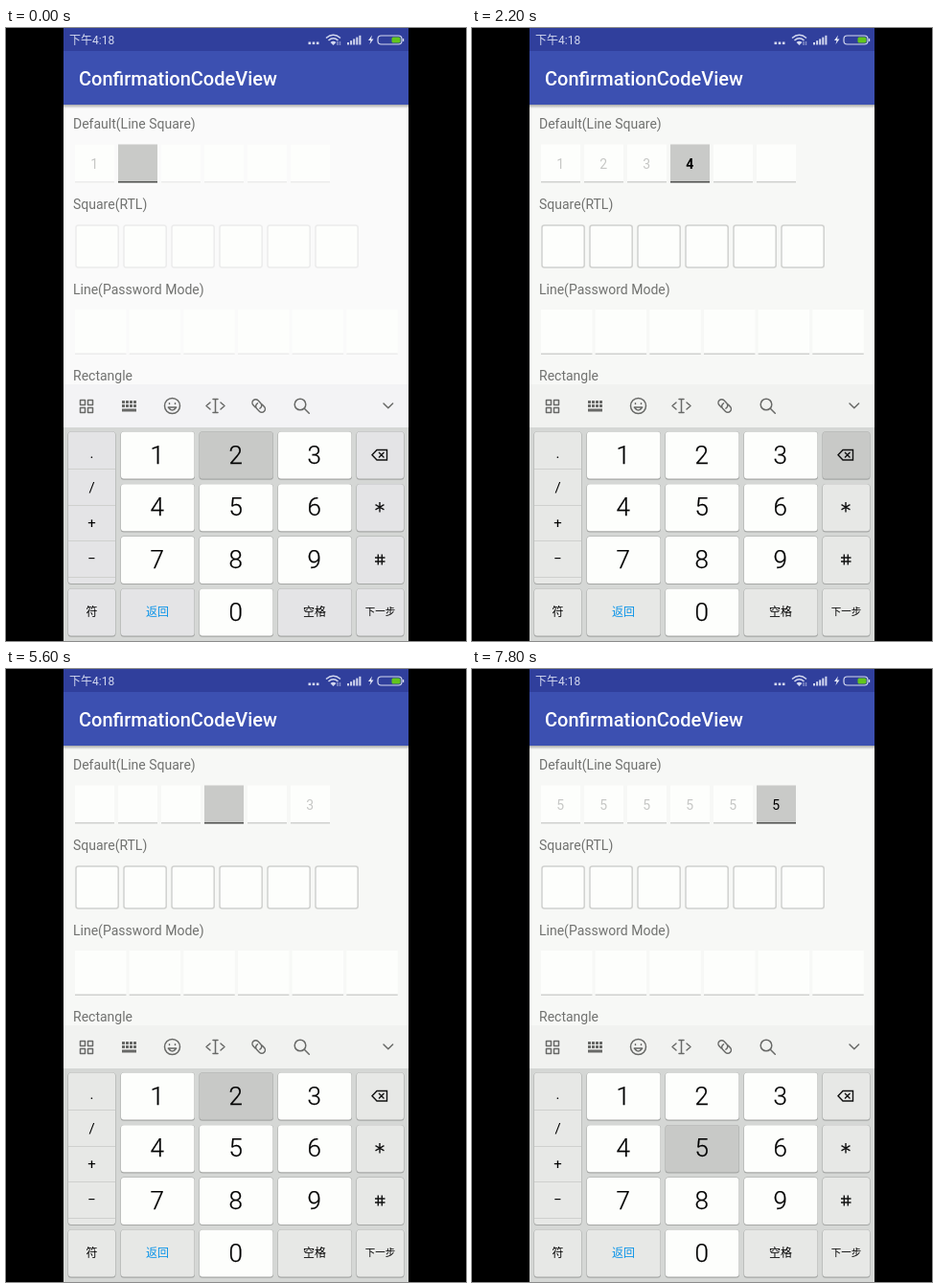
These frames come from a looping animation (480x640 px, 8 s). An HTML page:

```html
<!DOCTYPE html>
<html lang="en">
<head>
<meta charset="utf-8">
<title>Code input demo</title>
<style>
html, body { margin: 0; width: 100%; height: 100%; overflow: hidden; background: #000; }
svg { display: block; width: 480px; height: 640px; font-family: Roboto, "Noto Sans CJK SC", "Noto Sans CJK", sans-serif;
  --page: #f7f8f6; --line: #d0d1cf; --bar: #f1f2f0; --soft: #e7e8e6; }
svg.fresh { --page: #fafafa; --line: #ececec; --bar: #f3f3f5; --soft: #e4e4e6; }
.label { font-size: 14px; fill: #717270; }
.cell rect { fill: #fdfefc; }
.cell path { stroke: var(--line); stroke-width: 1.5; }
.cell text { font-size: 14px; fill: #c6c7c5; text-anchor: middle; }
.cell.focus rect { fill: #c9cac8; }
.cell.focus path { stroke: #555654; }
.cell.focus text { fill: #000; }
.erasing .cell.focus text { font-weight: 700; }
.square { fill: #fdfefc; stroke: var(--line); stroke-width: 1.5; }
.key .shade { fill: #a6a8a6; }
.key .face { fill: #fdfefc; }
.key.soft .face { fill: var(--soft); }
.key.down .face { fill: #c8c9c7; }
.key text { text-anchor: middle; fill: #000; }
.num { font-size: 26px; font-weight: 300; stroke: #000; stroke-width: .25px; }
.small { font-size: 12px; }
.icon { fill: none; stroke: #686967; stroke-width: 1.5; stroke-linecap: round; stroke-linejoin: round; }
.ink { fill: none; stroke: #111; stroke-width: 1.4; }
.status { fill: none; stroke: #d3d8ef; stroke-width: 1.5; }
</style>
</head>
<body>
<svg id="stage" viewBox="0 0 480 640"></svg>
<script>
const stage = document.getElementById('stage');
const times = (n, make) => Array.from({ length: n }, (_, i) => make(i)).join('');
const rect = (x, y, w, h, fill, extra = '') =>
  `<rect x="${x}" y="${y}" width="${w}" height="${h}" ${fill ? `fill="${fill}"` : ''} ${extra}/>`;
const text = (x, y, content, cls, extra = '') =>
  `<text x="${x}" y="${y}" class="${cls}" ${extra}>${content}</text>`;
const path = (d, cls, extra = '') => `<path d="${d}" class="${cls}" ${extra}/>`;

const lineCell = (x, y, w, h, id = '') =>
  `<g class="cell" ${id && `id="${id}"`}>${rect(x, y, w, h)}
   <path d="M${x} ${y + h - .7}h${w}"/><text x="${x + w / 2 - .2}" y="147"></text></g>`;

const ROW = 54.7;
const key = (id, x, row, w, content, soft, rows = 1) => {
  const y = 421.5 + row * ROW, h = 49 + (rows - 1) * ROW;
  return `<g class="key ${soft ? 'soft' : ''}" id="key-${id}">
    ${rect(x - .5, y - .3, w + 1, h + 1.5, '', 'rx="3.5" class="shade"')}
    ${rect(x, y, w, h, '', 'rx="3" class="face"')}${content}</g>`;
};
const digit = (n, col, row) =>
  key(n, 120 + col * 82, row, 76.5, text(157.8 + col * 82, 454.7 + row * ROW, n, 'num'));

function statusBar() {
  return rect(60, 0, 360, 24, '#303f9c')
    + text(66, 17, '下午4:18', 'time', 'font-size="12" fill="#d3d8ef"')
    + times(3, i => rect(315.5 + i * 4.2, 14.5, 2.6, 2.6, '#d3d8ef'))
    + path('M334 10.5Q341.5 4 349 10.5M336.5 13Q341.5 8.5 346.5 13', 'status')
    + path('M338.5 15Q341.5 12.5 344.5 15L341.5 18Z', '', 'fill="#d3d8ef"')
    + path('M346 14v4M348.5 14v4', 'status', 'opacity=".5"')
    + times(5, i => rect(356 + i * 3.1, 15 - i * 1.8, 2, 2.5 + i * 1.8, '#d3d8ef'))
    + path('M382 7.5l-4 5.5h2.5l-1 4 4-5.500h-2.500z', '', 'fill="#e5e8f5"')
    + rect(388, 8, 25, 9, 'none', 'rx="3.5" stroke="#d3d8ef" stroke-width="1.2"')
    + rect(402.5, 9.5, 9, 6, '#62c51c', 'rx="1.5"')
    + rect(414, 11, 1.2, 3, '#d3d8ef');
}

function page() {
  return rect(60, 80, 360, 292, 'var(--page)')
    + rect(60, 80, 360, 4, 'url(#shadow)')
    + text(70, 105, 'Default(Line Square)', 'label')
    + times(6, i => lineCell(72 + i * 45, 121.5, 41, 40, 'cell-' + i))
    + text(70, 189, 'Square(RTL)', 'label')
    + times(6, i => rect(73 + i * 50, 206, 44.2, 44, '', 'rx="2.5" class="square"'))
    + text(70, 278, 'Line(Password Mode)', 'label')
    + times(6, i => lineCell(72 + i * 56.65, 294, 53.5, 47))
    + text(70, 368, 'Rectangle', 'label');
}

function toolbar() {
  return rect(60, 372, 360, 45, 'var(--bar)')
    + times(4, i => rect(77.5 + i % 2 * 8, 388.5 + (i >> 1) * 8, 5, 5, '', 'class="icon"'))
    + times(8, i => rect(121 + i % 4 * 4, 389 + (i >> 2) * 4, 3, 3, '#686967'))
    + rect(121, 397.5, 15, 3, '#686967')
    + '<circle cx="173.500" cy="394.500" r="8" class="icon"/>'
    + path('M170.500 391.800v.8M176.500 391.800v.8M169.300 396Q173.500 402 177.700 396Z', 'icon')
    + path('M213 391l-4 3.500 4 3.500M224 391l4 3.500-4 3.500M218.500 388v13M216 387.500h5M216 401.500h5', 'icon')
    + `<g class="icon" transform="translate(263.700 394.500) rotate(45)">
        <path d="M-1.500 3.500h-3a3.500 3.500 0 0 1 0-7h4a3.500 3.500 0 0 1 3.200 4.500M1.500-3.500h3a3.500 3.500 0 0 1 0 7h-4a3.500 3.500 0 0 1-3.200-4.500"/></g>`
    + '<circle cx="307" cy="393" r="5.800" class="icon"/>' + path('M311.300 397.300l5 5', 'icon')
    + path('M394 392l4.800 4.800 4.800-4.800', 'icon');
}

function keyboard() {
  const symbols = ['.', '/', '+', '−'].map((s, i) =>
    text(89.5, [449, 485, 522, 559][i], s, '', 'font-size="15"')).join('');
  const dividers = path('M65 460.500h49M65 498.500h49M65 535.500h49M65 573.500h49', '', 'stroke="#cfd0ce"');
  const erase = path('M387 440.500h10.500v10.500h-10.500l-5-5.250zM389 443l5.500 5.500M394.500 443l-5.500 5.500', 'ink');
  const star = path('M390 495v10.500M385.500 497.700l9 5.200M394.500 497.700l-9 5.200', 'ink');
  const hash = path('M388.300 549.500v11M392.300 549.500v11M385 553h10.500M385 557h10.500', 'ink');
  return rect(60, 417, 360, 223, '#d5d7d5')
    + key('symbols', 65, 0, 49, dividers + symbols, true, 3)
    + times(9, i => digit(i + 1, i % 3, Math.floor(i / 3)))
    + digit(0, 1, 3)
    + key('erase', 366, 0, 49, erase, true)
    + key('star', 366, 1, 49, star, true)
    + key('hash', 366, 2, 49, hash, true)
    + key('marks', 65, 3, 49, text(89.5, 614, '符', 'small'), true)
    + key('back', 120, 3, 76.5, text(158, 614, '返回', 'small', 'style="fill:#0c94e8"'), true)
    + key('space', 284, 3, 76.5, text(322, 614, '空格', 'small'), true)
    + key('next', 366, 3, 49, text(390.5, 613, '下一步', '', 'font-size="10.5"'), true);
}

stage.innerHTML = `<defs><linearGradient id="shadow" x2="0" y2="1">
    <stop stop-color="#000" stop-opacity=".32"/><stop offset="1" stop-color="#000" stop-opacity="0"/>
  </linearGradient></defs>`
  + rect(0, 0, 480, 640, '#000') + page() + statusBar()
  + rect(60, 24, 360, 56, '#3c50b1')
  + text(76, 60, 'ConfirmationCodeView', '', 'font-size="20" font-weight="500" fill="#fff"')
  + toolbar() + keyboard();

// [start ms, cell contents, focused cell, pressed key]
const steps = [
  [0, '1', 1, '2'], [200, '12', 2], [400, '12', 2, '3'], [600, '123', 3, '4'],
  [800, '1234', 4, '5'], [1000, '12345', 5, '6'], [1200, '123456', 5],
  [1600, '123456', 5, 'erase'], [1800, '12345', 4], [2000, '12345', 4, 'erase'],
  [2200, '1234', 3, 'erase'], [2400, '12', 1, 'erase'], [2600, '1', 0], [2800, '', 0],
  [3800, '', 5], [4400, '', 5, '3'], [4600, '     3', 5],
  [5000, '     3', 3], [5600, '     3', 3, '2'], [5800, '   2 3', 4],
  [6400, '   2 3', 0], [7000, '   2 3', 0, '5'], [7200, '55 2 3', 2],
  [7400, '5552 3', 3, '5'], [7600, '555553', 5], [7800, '555555', 5, '5']
];
const cells = [...stage.querySelectorAll('[id^="cell-"]')];
const keys = [...stage.querySelectorAll('.key')];
let shown;

function show(step) {
  if (step === shown) return;
  shown = step;
  const [start, code, focus, pressed] = step;
  cells.forEach((cell, i) => {
    cell.classList.toggle('focus', i === focus);
    cell.querySelector('text').textContent = (code[i] || '').trim();
  });
  keys.forEach(k => k.classList.toggle('down', k.id === 'key-' + pressed));
  stage.classList.toggle('fresh', start === 0);
  stage.classList.toggle('erasing', pressed === 'erase');
}

const origin = performance.now();
function tick() {
  const t = (performance.now() - origin) % 8000;
  show(steps.findLast(([start]) => start <= t));
  requestAnimationFrame(tick);
}
tick();
</script>
</body>
</html>
```
